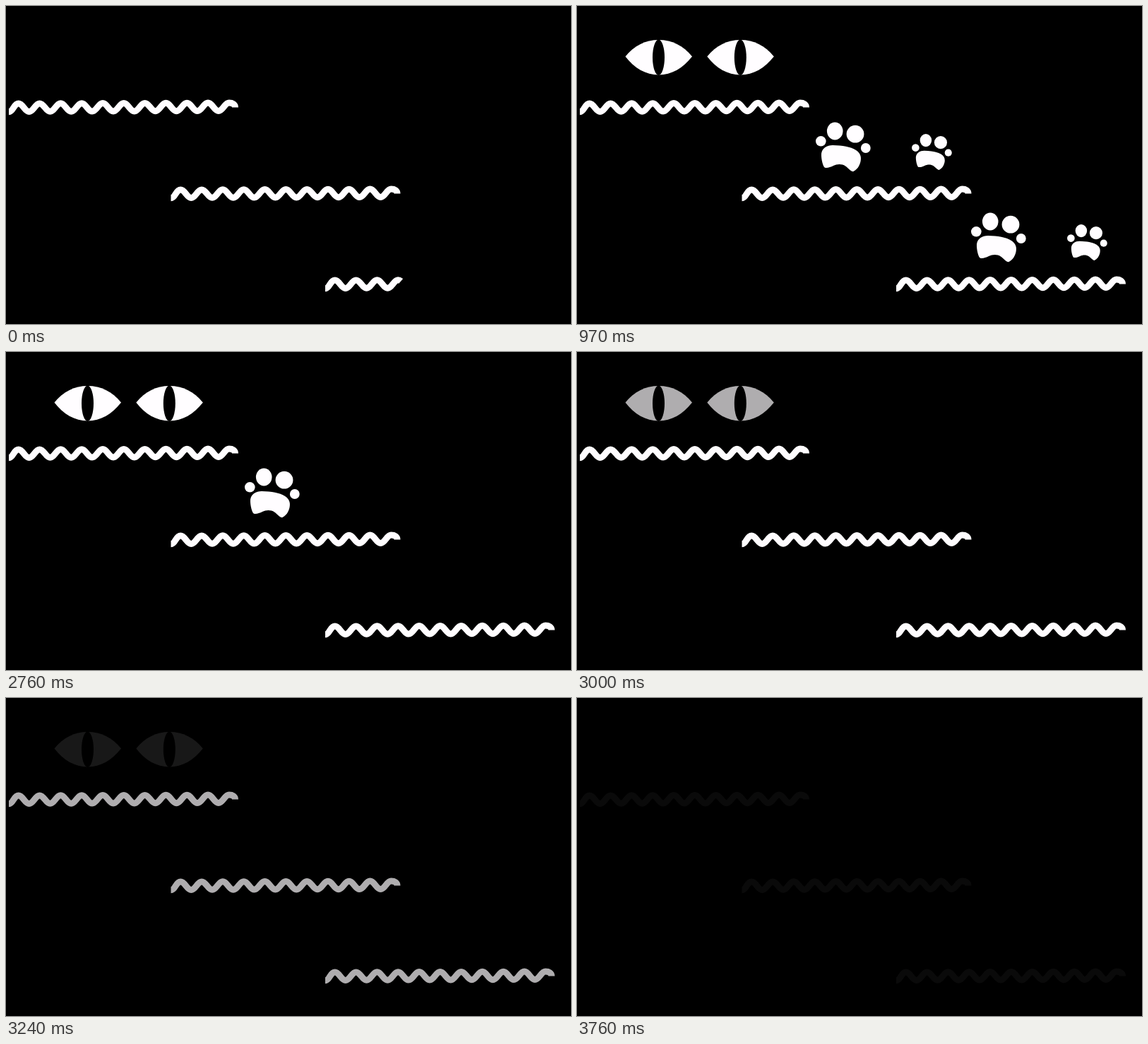
An HTML page that plays this animation: 800x450 px, repeating every 4.09 s.

```html
<!DOCTYPE html>
<html lang="en">
<head>
<meta charset="utf-8">
<title>Cat in the dark</title>
<style>
  html, body { margin: 0; width: 100%; height: 100%; overflow: hidden; background: #000; }
  svg { display: block; width: 100vw; height: 100vh; }

  .waves { animation: dim 4090ms linear infinite; }
  .draw { stroke-dasharray: 9 9; animation: draw 4090ms infinite; }
  .paw { visibility: hidden; animation: show 4090ms step-end infinite; animation-delay: var(--at); }
  .eyes { opacity: 0; animation: stare 4090ms linear 970ms infinite; }

  @keyframes draw {
    0% { stroke-dashoffset: 6; animation-timing-function: steps(6, end); }
    4.4%, 100% { stroke-dashoffset: 0; }
  }
  @keyframes show {
    0% { visibility: visible; }
    49.63%, 100% { visibility: hidden; }
  }
  @keyframes stare {
    0%, 46.55% { opacity: 1; }
    56.5%, 100% { opacity: 0; }
  }
  @keyframes dim {
    0%, 73.35% { opacity: 1; }
    83.62% { opacity: .457; animation-timing-function: step-end; }
    86.06% { opacity: .345; animation-timing-function: step-end; }
    88.26% { opacity: .225; animation-timing-function: step-end; }
    90.22% { opacity: .12; animation-timing-function: step-end; }
    91.93%, 100% { opacity: .043; }
  }
</style>
</head>
<body>
<svg viewBox="0 0 800 450" fill="#fffdff">
  <defs>
    <path id="wave" pathLength="9"/>
    <g id="paw">
      <circle cx="345.3" cy="191.3" r="7.3"/>
      <ellipse cx="365.2" cy="177" rx="11.3" ry="12.4"/>
      <circle cx="394" cy="181.2" r="12.4"/>
      <circle cx="408.8" cy="201" r="6.9"/>
      <path d="M346 209C347 201 354 197 362 197C376 197.5 387 199 395 204C401 208 403 213 401.5 220C400 227 396 232 391 234.3C388 234.5 385 230 380 226.5C375 223 368 223.5 363 226C359 228 355 229.5 351 228.8C348.5 228 345.5 217 346 209Z"/>
    </g>
    <g id="small"><use href="#paw" transform="translate(227.3 60.9) scale(.73)"/></g>
    <g id="eye">
      <path d="M68.5 71.5C81 56 97 48 115.7 48S150.5 56 163 71.5C150 88 134 97.5 115.7 97.5S81 88 68.5 71.5Z"/>
      <ellipse cx="115.5" cy="72.7" rx="8.5" ry="25.2" fill="#000"/>
    </g>
  </defs>

  <g class="waves" fill="none" stroke="#fffdff" stroke-width="9">
    <use href="#wave"/>
    <use href="#wave" x="229.5" y="122"/>
    <use href="#wave" class="draw" x="448" y="250"/>
  </g>

  <g class="eyes">
    <use href="#eye"/>
    <use href="#eye" x="115.8"/>
  </g>

  <use href="#small" class="paw" x="220" y="128" style="--at: 360ms"/>
  <use href="#paw" class="paw" x="220" y="128" style="--at: 610ms"/>
  <use href="#small" class="paw" style="--at: 730ms"/>
  <use href="#paw" class="paw" style="--at: 970ms"/>
</svg>
<script>
  const ripple = 'c6 0 8.9 11.4 14.9 11.4s8.9 -11.5 14.9 -11.5';
  document.getElementById('wave').setAttribute('d',
    'M4 149.7c6.5 0 6.8 -11.7 13.8 -11.7' + ripple.repeat(10) + 'c5 0 8.7 2 8.7 6.6');
</script>
</body>
</html>
```
